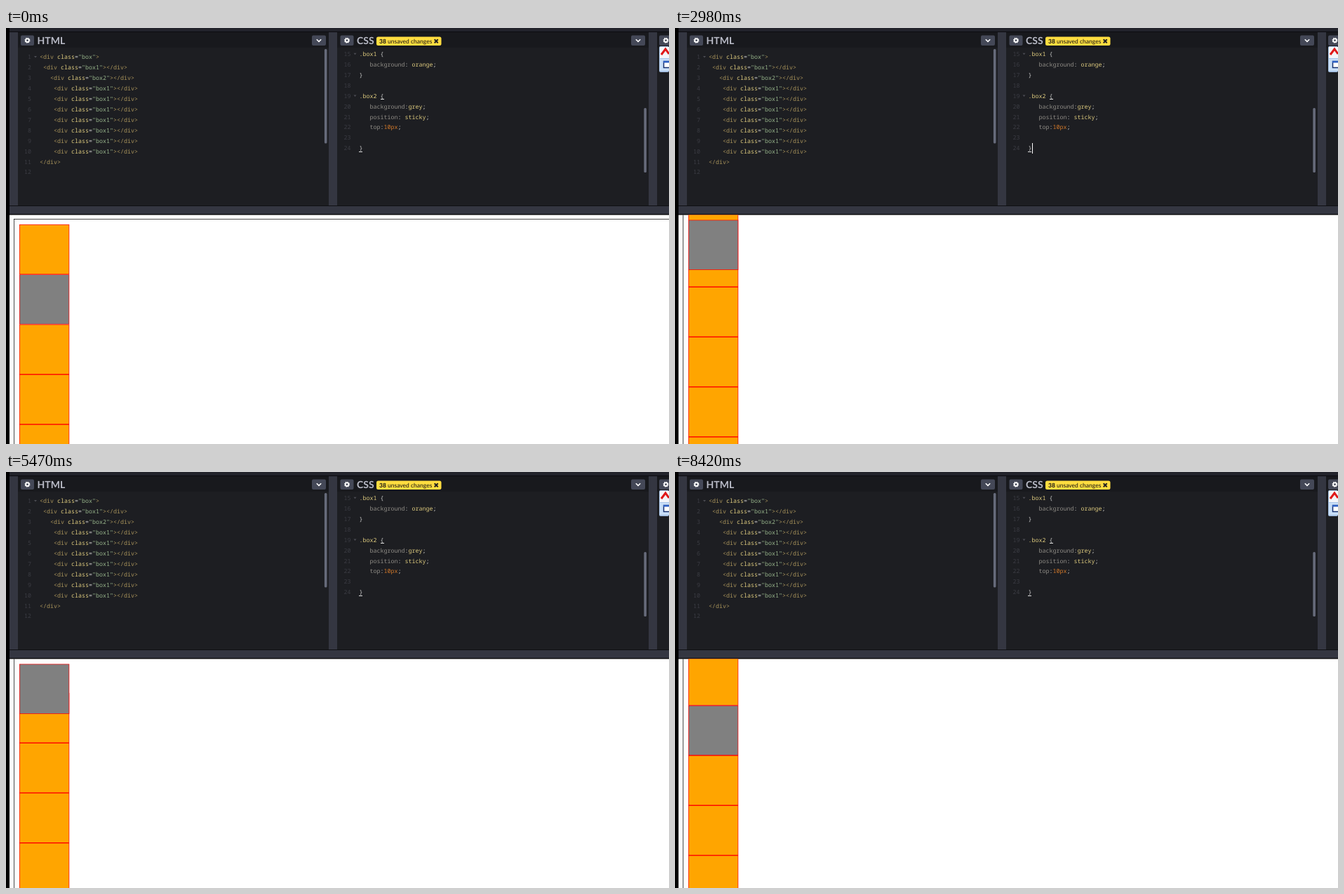
Animation of 945 by 593 pixels, one loop 8720 ms. Source, as an HTML page:

```html
<!DOCTYPE html>
<html lang="en">
<head>
<meta charset="utf-8">
<title>Sticky position demo</title>
<style>
  html, body { margin: 0; width: 100%; height: 100%; overflow: hidden; background: #000; }
  svg { display: block; width: 945px; height: 593px; }
  text { white-space: pre; text-rendering: geometricPrecision; }
  .code { font: 8.33px "Noto Sans Mono", "DejaVu Sans Mono", monospace; }
  .title { font: 700 14px Lato, sans-serif; fill: #b9bbc7; }
  .badge { font: 8.5px Lato, sans-serif; fill: #111; }
</style>
</head>
<body>
<svg id="stage" viewBox="0 0 945 593">
  <defs><clipPath id="view"><rect x="5" y="266.5" width="940" height="327"/></clipPath></defs>
  <g id="editor"></g>
  <g clip-path="url(#view)">
    <rect x="5" y="266" width="940" height="327" fill="#fff"/>
    <g id="page" transform="translate(5.46 266.5) scale(.7125)"></g>
  </g>
</svg>
<script>
const LOOP = 8720;
const editor = document.getElementById('editor');
const page = document.getElementById('page');

function add(parent, tag, attrs, text) {
  const node = document.createElementNS('http://www.w3.org/2000/svg', tag);
  for (const key in attrs) node.setAttribute(key, attrs[key]);
  if (text !== undefined) node.textContent = text;
  parent.appendChild(node);
  return node;
}
const rect = (parent, x, y, width, height, fill, rx = 0) =>
  add(parent, 'rect', { x, y, width, height, fill, rx });

// Editor panels
rect(editor, 0, 0, 945, 593, '#000');
rect(editor, 5, 0, 940, 254, '#1d1e22');
rect(editor, 5, 0, 940, 5, '#22232b');
rect(editor, 5, 5, 940, 1, '#0c0c10');
rect(editor, 17, 6, 928, 22, '#18191d');
for (const x of [5, 460, 916]) rect(editor, x, 6, 12, 247, '#343641');
rect(editor, 5, 253, 940, 1, '#000');
rect(editor, 5, 253.7, 940, 11.5, '#343641');
rect(editor, 453.9, 30, 3.6, 134.5, '#666a7a', 1.5);
rect(editor, 909.3, 114, 3.6, 92, '#666a7a', 1.5);

function gear(x) {
  rect(editor, x, 10.5, 19, 14.5, '#444857', 2);
  const cx = x + 9.5, cy = 17.7;
  add(editor, 'circle', { cx, cy, r: 2.3, fill: 'none', stroke: '#fff', 'stroke-width': 1.8 });
  add(editor, 'circle', { cx, cy, r: 3.4, fill: 'none', stroke: '#fff', 'stroke-width': 1.2,
    'stroke-dasharray': `${3.4 * Math.PI / 8} ${3.4 * Math.PI / 8}` });
}
function chevron(x) {
  rect(editor, x, 10.5, 20, 14.5, '#444857', 2);
  add(editor, 'path', { d: `M${x + 6.8} 16.2l3.2 3.2 3.2-3.2`, fill: 'none', stroke: '#fff', 'stroke-width': 1.6 });
}
[21, 476.5, 931].forEach(gear);
[436, 891].forEach(chevron);
add(editor, 'text', { x: 44.5, y: 23.3, class: 'title' }, 'HTML');
add(editor, 'text', { x: 500, y: 23.3, class: 'title' }, 'CSS');

rect(editor, 528, 12.5, 92.5, 12.5, '#ffdd40', 2.5);
const badge = add(editor, 'text', { x: 532, y: 21.5, class: 'badge' });
add(badge, 'tspan', { 'font-weight': 700 }, '38');
add(badge, 'tspan', {}, ' unsaved changes');
add(editor, 'path', { d: 'M610.7 16.2l5 5m0-5l-5 5', stroke: '#222', 'stroke-width': 2 });

// Small tool strip at the right edge
rect(editor, 931, 26, 14, 37, '#a9c4e6', 2);
rect(editor, 932, 27, 13, 16, '#f4f6fa');
rect(editor, 932, 44, 13, 17, '#c9dff8');
add(editor, 'path', { d: 'M934 38l6-8 5 7', fill: 'none', stroke: '#e01818', 'stroke-width': 3 });
add(editor, 'path', { d: 'M945 47.5h-7.5v9h7.5', fill: '#fff', stroke: '#17306e', 'stroke-width': 1.5 });
rect(editor, 937, 47, 8, 2.5, '#2c5fc4');

// Code
function codeLine(x, y, tokens) {
  const line = add(editor, 'text', { x, y, class: 'code' });
  for (const [fill, text] of tokens) add(line, 'tspan', { fill }, text);
}
function lineNumber(x, y, n, foldable) {
  add(editor, 'text', { x, y, class: 'code', fill: '#3b3c43', 'text-anchor': 'end' }, n);
  if (foldable) add(editor, 'path', { d: `M${x + 4} ${y - 4}h4l-2 2.5z`, fill: '#4c4d54' });
}
const TAG = '#a7925a', NAME = '#ddca7e', STR = '#96b38a', PUNCT = '#ccc', PROP = '#8f8c86', NUM = '#d0782a';

const openTag = name => [[TAG, '<div '], [NAME, 'class'], [PUNCT, '='], [STR, `"${name}"`], [TAG, '>']];
const item = (indent, name) => [[TAG, ' '.repeat(indent)], ...openTag(name), [TAG, '</div>']];
const htmlLines = [
  openTag('box'), item(1, 'box1'), item(3, 'box2'),
  ...Array.from({ length: 7 }, () => item(4, 'box1')),
  [[TAG, '</div>']], []
];
htmlLines.forEach((tokens, i) => {
  const y = 44 + i * 14.95;
  lineNumber(36, y, i + 1, i === 0);
  codeLine(48, y, tokens);
});

const rule = (prop, gap, color, value) =>
  [[PROP, '   ' + prop], [PUNCT, ':' + gap], [color, value], [PUNCT, ';']];
const cssLines = [
  [[NAME, '.box1'], [PUNCT, ' {']],
  rule('background', ' ', NAME, 'orange'),
  [[PUNCT, '}']],
  [],
  [[NAME, '.box2'], [PUNCT, ' {']],
  rule('background', '', NAME, 'grey'),
  rule('position', ' ', NAME, 'sticky'),
  rule('top', '', NUM, '10px'),
  [],
  [[PUNCT, '}']]
];
cssLines.forEach((tokens, i) => {
  const y = 39.8 + i * 14.95;
  lineNumber(491.5, y, i + 15, i === 0 || i === 4);
  codeLine(503.5, y, tokens);
});
rect(editor, 534, 101, 5, 1, '#ddd');
rect(editor, 503, 176, 5, 1, '#ddd');
const caret = rect(editor, 509, 164, 1, 15, '#fff');

// Scrolling page, in its own CSS pixels
const COUNT = 9, STICKY = 1, SIZE = 100, EDGE = 19, STICK_Y = 10;
const content = add(page, 'g', {});
add(content, 'rect', { x: 8.5, y: 8.5, width: 1500, height: COUNT * SIZE + 21, fill: 'none', stroke: '#000' });
// Red runs behind the boxes show through as their borders
rect(content, EDGE, EDGE, SIZE, STICKY * SIZE, '#f00');
rect(content, EDGE, EDGE + (STICKY + 1) * SIZE, SIZE, (COUNT - STICKY - 1) * SIZE, '#f00');
for (let i = 0; i < COUNT; i++) {
  if (i !== STICKY) rect(content, EDGE + 1, EDGE + 1 + i * SIZE, SIZE - 2, SIZE - 2, '#ffa500');
}
const sticky = add(page, 'g', {});
rect(sticky, EDGE, 0, SIZE, SIZE, '#f00');
rect(sticky, EDGE + 1, 1, SIZE - 2, SIZE - 2, '#808080');

// Scroll moves in bursts: [start, end, number of steps]
const BURSTS = [
  [0, 0, 1], [2000, 2090, 2], [2240, 3040, 11], [3120, 3120, 1], [3670, 4530, 12],
  [4610, 4610, 1], [5160, 5760, 9], [5930, 6780, 12], [6860, 6940, 2]
];
// [time, scroll offset]
const OFFSETS = [
  [0, 0], [2000, 8], [2090, 26], [2240, 50], [2960, 375], [3040, 407], [3120, 480],
  [3670, 446], [4139, 211], [4530, 26], [4610, 0], [5160, 14], [5760, 288],
  [5930, 266], [6162, 222], [6780, 63], [6860, 42], [6940, 26]
];
const BLINKS = [1540, 2090, 2600, 3120, 3670, 4200, 4760, 5250, 5760, 6320, 6860, 7320, 7900, 8420];

function snap(t) {
  const [start, end, steps] = BURSTS.filter(b => b[0] <= t).pop();
  if (t >= end) return end;
  const gap = (end - start) / (steps - 1);
  return start + gap * Math.floor((t - start) / gap + 0.1);
}
function scrollAt(t) {
  const time = snap(t);
  const next = OFFSETS.findIndex(k => k[0] > time);
  if (next < 0) return OFFSETS[OFFSETS.length - 1][1];
  const [t0, s0] = OFFSETS[next - 1], [t1, s1] = OFFSETS[next];
  return Math.round(s0 + (s1 - s0) * (time - t0) / (t1 - t0));
}

function render(t) {
  const scroll = scrollAt(t);
  const stickyY = Math.max(EDGE + STICKY * SIZE - scroll, STICK_Y);
  content.setAttribute('transform', `translate(0 ${-scroll})`);
  sticky.setAttribute('transform', `translate(0 ${stickyY})`);
  const blinks = BLINKS.filter(b => b <= t).length;
  caret.setAttribute('visibility', blinks % 2 ? 'visible' : 'hidden');
}

const began = performance.now();
function tick() {
  render((performance.now() - began) % LOOP);
  requestAnimationFrame(tick);
}
render(0);
requestAnimationFrame(tick);
</script>
</body>
</html>
```
